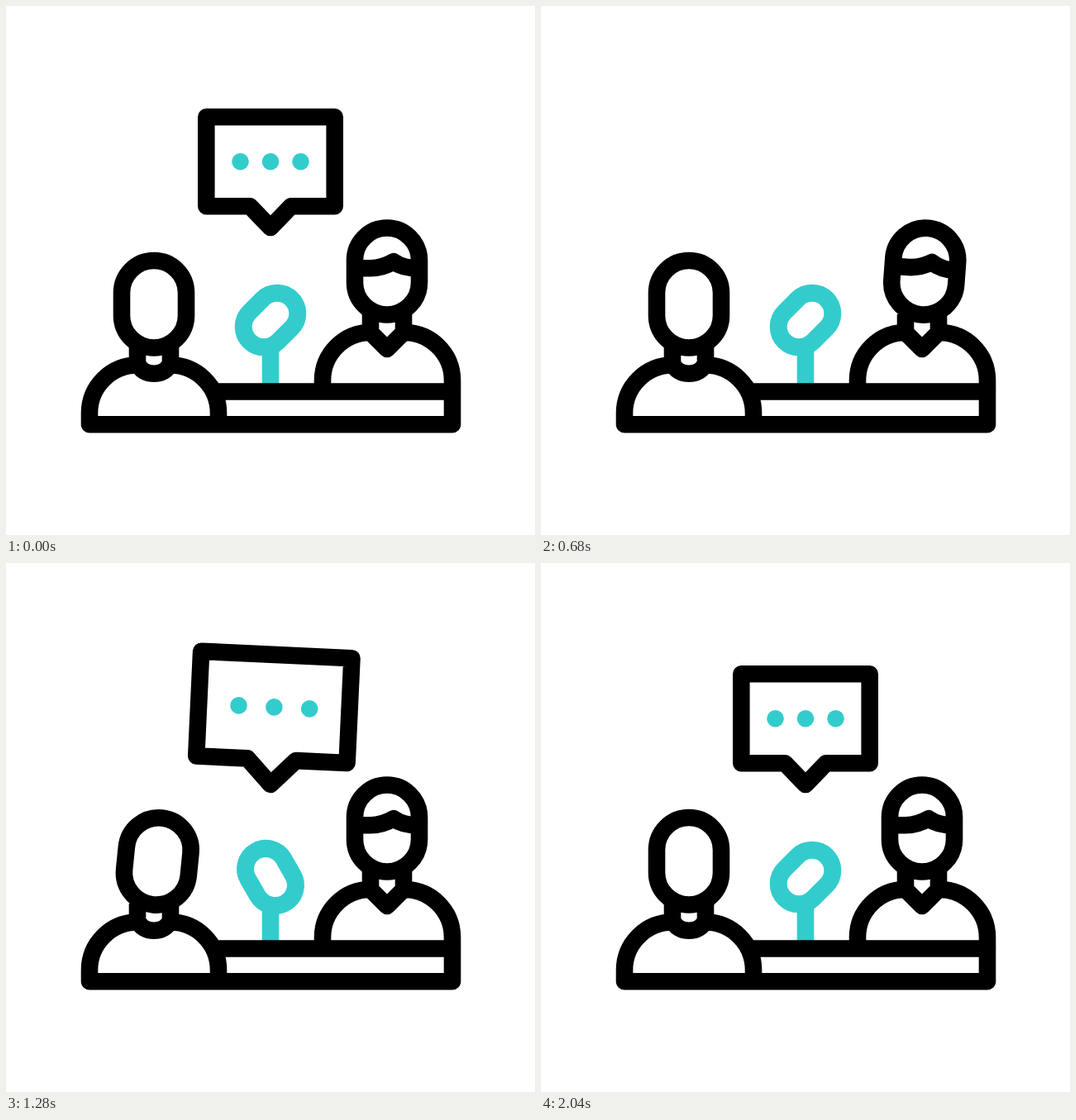
Animation of 640x640 px, one loop 2080 ms. Source, as an HTML page:

```html
<!DOCTYPE html>
<html lang="en">
<head>
<meta charset="utf-8">
<title>Interview</title>
<style>
html, body { margin: 0; width: 100%; height: 100%; overflow: hidden; background: #fff; }
svg { display: block; width: 640px; height: 640px; }
path, rect { fill: none; stroke: #000; stroke-width: 20.6; stroke-linejoin: round; }
.teal { stroke: #33cccc; }
#mic { stroke-width: 21; }
#bubble path { vector-effect: non-scaling-stroke; }
.dot { stroke-linecap: round; }
</style>
</head>
<body>
<svg viewBox="0 0 640 640">
  <path class="teal" d="M320 412V458"/>
  <rect id="mic" class="teal" x="295.2" y="343.9" width="49.6" height="72.2" rx="24.8"/>

  <path d="M255 466.5H540V506.2H101V492.5A58 58 0 0 1 159 434.5M199 434.5A58 58 0 0 1 257 492.5V506"/>
  <path d="M159 412V432C165 449 193 449 199 432V412"/>
  <rect id="guest" x="140" y="308" width="78" height="105.5" rx="39"/>

  <path d="M383 466V453A58 58 0 0 1 441 395M481 395A58 58 0 0 1 540 453V466"/>
  <path d="M441 373V395L461 415L481 395V373"/>
  <g id="host">
    <rect x="422" y="268.5" width="78" height="105" rx="39"/>
    <path d="M423 317.3H441Q455 317.3 469 309.3Q480 317.3 499 317.3"/>
  </g>

  <g id="bubble">
    <path d="M242.3 134.2H397.7V242.2H345L320 268L295 242.2H242.3Z"/>
    <path class="teal dot" d="M283.5 188.2h.01"/>
    <path class="teal dot" d="M320 188.2h.01"/>
    <path class="teal dot" d="M356.5 188.2h.01"/>
  </g>
</svg>
<script>
const LOOP = 2080, STEP = 40;
const $ = id => document.getElementById(id);
const dots = document.querySelectorAll('.dot');
const smooth = p => p * p * (3 - 2 * p);
const easeOut = p => p * (2 - p);
const part = (t, a, b) => Math.min(1, Math.max(0, (t - a) / (b - a)));

// Eased value through [time, value] keys.
function track(t, keys, ease = smooth) {
  let v = keys[0][1];
  for (let i = 1; i < keys.length; i++) {
    const [a, from] = keys[i - 1], [b, to] = keys[i];
    if (t >= a) v = from + (to - from) * ease(part(t, a, b));
  }
  return v;
}

const turn = (id, angle, x, y) =>
  $(id).setAttribute('transform', `rotate(${angle} ${x} ${y})`);

function drawBubble(t) {
  const bubble = $('bubble');
  let move;
  if (t < 680) {
    move = `translate(0 ${-118 * Math.max(0, (t - 40) / 320) ** 2})`;
  } else {
    // Pops out of its tip, overshoots and settles.
    const ease = t < 1160 ? easeOut : smooth;
    const scale = track(t, [[680, 0], [1160, 1.262], [1470, 1]], ease);
    const angle = track(t, [[680, -37], [1160, 4], [1470, 0]], ease);
    move = `translate(320 268) rotate(${angle}) scale(${scale}) translate(-320 -268)`;
  }
  bubble.setAttribute('transform', move);
  bubble.style.display = t >= 560 && t <= 680 ? 'none' : '';
  dots.forEach((dot, i) => {
    const start = 1680 + i * 90;
    dot.style.strokeWidth = 20.6 - 6 * Math.sin(Math.PI * part(t, start, start + 180));
  });
}

function draw(now) {
  const t = Math.floor(now % LOOP / STEP) * STEP;
  turn('host', track(t, [[20, 0], [410, -8.1], [820, 8.8], [1190, 0]]), 461, 365);
  turn('guest', track(t, [[920, 0], [1240, 6], [1760, -11], [2040, 0]]), 179, 404);
  turn('mic', track(t, [[920, 45], [1240, -30], [1720, -30], [2040, 45]]), 320, 380);
  drawBubble(t);
}

let begin;
function tick(now) {
  begin ??= now;
  draw(now - begin);
  requestAnimationFrame(tick);
}
draw(0);
requestAnimationFrame(tick);
</script>
</body>
</html>
```
